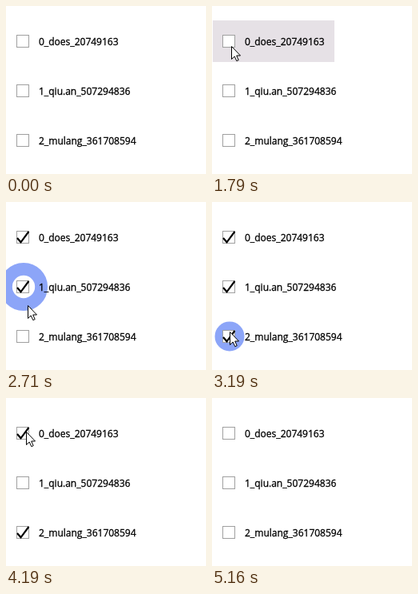
Animation, 250 px wide and 210 px high, one loop 5.54 s. Source, as an HTML page:

```html
<!DOCTYPE html>
<html lang="en">
<head>
<meta charset="utf-8">
<title>Check list</title>
<style>
  html, body { margin: 0; width: 100%; height: 100%; overflow: hidden; background: #fff; }
  svg { display: block; width: 250px; height: 210px; }
  text { font: 12px "Open Sans", "Noto Sans", sans-serif; stroke: #000; stroke-width: .3; }
  .hover { fill: #e6e1e6; }
  .ring { fill: none; stroke: #8ca5f8; }
  .box { fill: #fff; stroke: #a0a0a0; }
  .tick { fill: none; stroke: #000; stroke-width: 2.2; }
</style>
</head>
<body>
<svg viewBox="0 0 250 210">
  <g id="rows"></g>
  <path id="cursor" d="M.5 .5V16.5L4.2 13L6.8 18.7L9.2 17.6L6.7 12H11.5Z" fill="#fff" stroke="#000"/>
</svg>
<script>
const LOOP = 5540, RIPPLE = 300, RADIUS = 33;
const FIRST_CLICK = 1910, GAP = 590, LINGER = 130, REST = 100, HOVER_DELAY = 85;
const labels = ['0_does_20749163', '1_qiu.an_507294836', '2_mulang_361708594'];

// Where the pointer stops to click, in order
const visits = [
  { row: 0, x: 24, y: 50 }, { row: 1, x: 24, y: 107 }, { row: 2, x: 22, y: 162 },
  { row: 1, x: 24, y: 99 }, { row: 0, x: 25, y: 42 }, { row: 2, x: 17, y: 175 }
];

// Pointer path as time, x, y: way in, each visit, way out
const path = [[20, 148, 164], [330, 100, 160], [950, 79, 120], [1130, 69, 70]];
visits.forEach((v, k) => {
  v.click = FIRST_CLICK + k * GAP;
  v.arrive = k ? v.click - REST : 1700;
  path.push([v.arrive, v.x, v.y], [v.click + LINGER, v.x, v.y]);
});
path.push([5150, 40, 212]);

const cursor = document.getElementById('cursor');
const holder = document.getElementById('rows');

holder.innerHTML = labels.map((label, i) => `
  <g transform="translate(0 ${18 + i * 62})">
    <rect class="hover" x="1" height="52"/>
    <circle class="ring" cx="22" cy="26"/>
    <rect class="box" x="13.5" y="18.5" width="15" height="15"/>
    <path class="tick" d="M14 27L18.5 32.3L28.4 19"/>
    <text x="41" y="31">${label}</text>
  </g>`).join('');

const parts = [...holder.children].map(g => {
  const [hover, ring, , tick, text] = g.children;
  hover.setAttribute('width', Math.round(text.getComputedTextLength()) + 52);
  return { hover, ring, tick };
});

const show = (el, on) => el.setAttribute('visibility', on ? 'visible' : 'hidden');
const easeOut = p => 1 - (1 - p) ** 2;

function drawRow({ hover, ring, tick }, row, t) {
  const own = visits.filter(v => v.row === row);
  const done = own.filter(v => t >= v.click);
  const p = done.length ? (t - done.at(-1).click) / RIPPLE : 1;
  show(hover, own.some(v => t >= v.arrive + HOVER_DELAY && t < v.click));
  show(tick, done.length % 2);
  show(ring, p < 1);
  if (p < 1) {
    const outer = RADIUS * easeOut(p), inner = RADIUS * p ** 2.4;
    ring.setAttribute('r', (outer + inner) / 2);
    ring.setAttribute('stroke-width', outer - inner);
  }
}

function drawCursor(t) {
  const i = path.findIndex(k => k[0] > t);
  show(cursor, i > 0);
  if (i < 1) return;
  const [t0, x0, y0] = path[i - 1], [t1, x1, y1] = path[i];
  const p = easeOut((t - t0) / (t1 - t0));
  const bow = y0 === y1 ? 0 : 4 * Math.sin(Math.PI * p);
  const x = Math.round(x0 + (x1 - x0) * p + bow);
  const y = Math.round(y0 + (y1 - y0) * p);
  cursor.setAttribute('transform', `translate(${x} ${y})`);
}

const start = performance.now();
function frame() {
  const t = (performance.now() - start) % LOOP;
  parts.forEach((part, i) => drawRow(part, i, t));
  drawCursor(t);
  requestAnimationFrame(frame);
}
frame();
</script>
</body>
</html>
```
